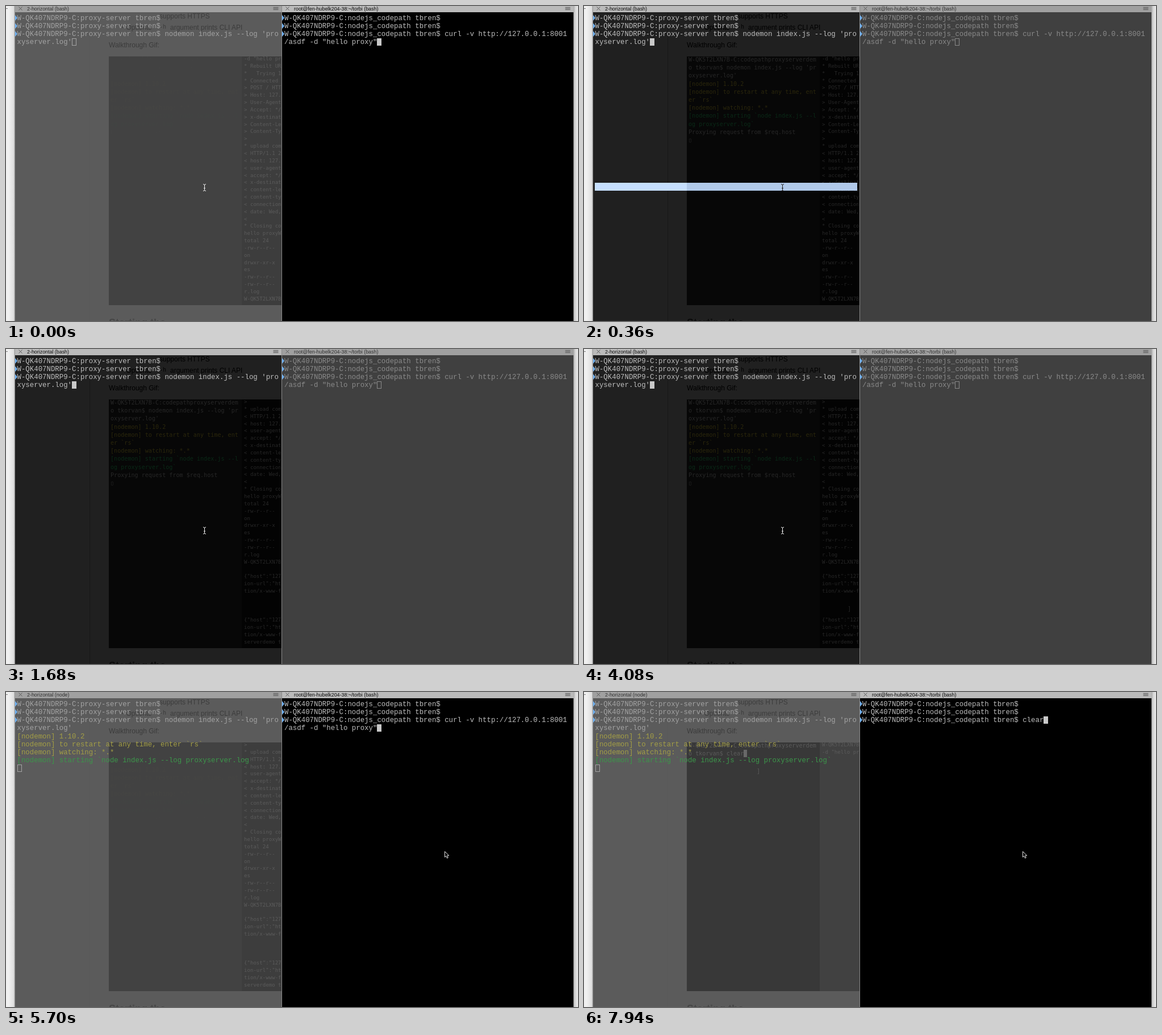
Recreate the animation shown at these times as an HTML page. Size 1007 by 556 pixels, loop 8 s.

```html
<!DOCTYPE html>
<html lang="en">
<head>
<meta charset="utf-8">
<style>
html, body { margin: 0; width: 100%; height: 100%; overflow: hidden; }
body { position: relative; background: #ececec; }
[hidden] { display: none !important; }
body div, body pre, body svg { position: absolute; margin: 0; white-space: pre; }
.edge { top: 0; bottom: 0; }

.pane {
  inset: 0; background: var(--bg); color: var(--fg);
  --bg: #404040; --fg: #8a8a8a; --bar: #a0a0a0; --name: #303030;
}
.pane.on { --bg: #000; --fg: #bebebe; --bar: #bababa; --name: #0a0a0a; }
#left {
  clip-path: inset(0 522px 0 16px);
  --bg: #5b5b5b; --fg: #a3a3a3; --page: #3c3c3c; --gif: #424242; --gif2: #3d3d3d;
  --faint: #5b5b5b; --rule: #595959; --yellow: #a39e46; --green: #3c964a;
}
#left.cleared { --gif: #383838; --gif2: #414141; }
#left.on {
  --bg: #202020; --fg: #bebebe; --page: #000; --gif: #070707; --gif2: #030303;
  --faint: #272727; --rule: #171717; --yellow: #b5b100; --green: #00a31c;
}
#right { clip-path: inset(0 8px 0 486px); }

.bar { left: 0; right: 0; top: 0; height: 11px; background: var(--bar); }
.name { top: 0; font: 8.9px/10px "Liberation Sans", Arial, sans-serif; color: var(--name); }
.icon { top: 0; width: 12px; height: 10px; stroke: #5c5c5c; fill: none; }

.term { top: 15px; font: 12.38px/14.15px "Liberation Mono", "Courier New", monospace; }
.mark { width: 4px; height: 10px; background: #6fb1f2; clip-path: polygon(0 0, 100% 50%, 0 100%); }
.caret {
  left: calc(var(--x) + var(--c) * 7.43px); top: calc(14.5px + var(--r) * 14.15px);
  width: 8px; height: 13.5px; box-sizing: border-box; border: 1px solid var(--fg);
}
.on .caret { background: #c9c9c9; border-color: #c9c9c9; }
.y { color: var(--yellow); }
.g { color: var(--green); }

.page { font: 12px/14px "Liberation Sans", Arial, sans-serif; color: var(--page); }
.gif { left: 181px; top: 89px; width: 304px; height: 439px; background: linear-gradient(90deg, var(--gif) 234px, var(--gif2) 0); }
.old { left: 184px; top: 88px; font: 10.1px/14.2px "DejaVu Sans Mono", monospace; color: var(--faint); }
.on .old .y { color: #2b270c; }
.on .old .g { color: #0a2917; }
.pane:not(.on) .ghost { opacity: .03; }
.side { left: 419px; top: 87px; font: 9.08px/12.85px "DejaVu Sans Mono", monospace; color: var(--faint); }
.block { display: inline-block; width: 6px; height: 13px; vertical-align: -3px; background: #686868; }
.sel { left: 19px; top: 311.5px; width: 462px; height: 14.5px; background: linear-gradient(90deg, #c6dfff 162px, #b0c9ea 0); }
.beam { left: 345px; top: 313px; width: 9px; height: 15px; fill: none; }
.arrow { width: 11px; height: 15px; }
</style>
</head>
<body>
<div class="edge" style="left:0;width:16px;background:linear-gradient(90deg,#f0f0f0 30%,#dedede 85%,#8c8c8c)"></div>
<div style="left:0;top:4px;width:3px;height:1px;background:#777"></div>
<div class="edge" style="right:0;width:8px;background:linear-gradient(90deg,#a9a9a9,#d6d6d6 40%,#e9e9e9)"></div>

<div class="pane" id="left" style="--x:19.5px">
  <div class="edge" style="left:147px;width:1px;background:var(--rule)"></div>
  <div class="page" style="left:270px;top:11px">supports HTTPS</div>
  <div class="page" style="left:204px;top:31px">• Optional</div>
  <div class="page" style="left:270px;top:31px;font:10px/14px 'Liberation Mono',monospace">-h</div>
  <div class="page" style="left:289px;top:31px">argument prints CLI API</div>
  <div class="page" style="left:181px;top:62px">Walkthrough Gif:</div>
  <div class="page" style="left:181px;top:549px;font-size:18px;line-height:20px;font-weight:bold;opacity:.7">Starting the</div>
  <div class="gif"></div>
  <pre class="old ghost" data-on="0-6650">W-QK5T2LXN7B-C:codepathproxyserverdem
o tkorvan$ nodemon index.js --log 'pr
oxyserver.log'
<span class="y">[nodemon] 1.10.2
[nodemon] to restart at any time, ent
er `rs`
[nodemon] watching: *.*</span>
<span class="g">[nodemon] starting `node index.js --l
og proxyserver.log`</span>
Proxying request from $req.host
▯</pre>
  <pre class="old" data-on="6650-8000">W-QK5T2LXN7B-C:codepathproxyserverdem
o tkorvan$ clear<i class="block"></i></pre>
  <pre class="side" id="side"></pre>
  <div class="old" style="left:464px;top:452px" data-on="4080-4220">]</div>
  <div class="old" style="left:454px;top:452px" data-on="4220-4370">]</div>
  <div class="old" style="left:304px;top:133px" data-on="6650-8000">]</div>

  <div class="bar"></div>
  <div class="name" style="left:37px">2-horizontal (<span data-on="0-4660">bash</span><span data-on="4660-8000">node</span>)</div>
  <div class="sel" data-on="150-1350"></div>
  <pre class="term" style="left:19.5px" id="shell"></pre>
  <pre class="term" style="left:19.5px;top:71.6px" data-on="4810-8000"><span class="y">[nodemon] 1.10.2
[nodemon] to restart at any time, enter `rs`
[nodemon] watching: *.*</span>
<span class="g">[nodemon] starting `node index.js --log proxyserver.log<span data-on="6650-8000">`</span></span></pre>
  <div class="caret" style="--c:13;--r:3" data-on="0-1350 1680-4370"></div>
  <div class="caret" style="--c:40;--r:2" data-on="1350-1680"></div>
  <div class="caret" style="--c:0;--r:4" data-on="4370-4810"></div>
  <div class="caret" style="--c:0;--r:8" data-on="4810-8000"></div>
</div>

<div class="pane" id="right" style="--x:490px">
  <div class="bar"></div>
  <div class="name" style="left:507px">root@fen-hubelk204-38:~/torbi (bash)</div>
  <pre class="term" style="left:490px" id="client"></pre>
  <div class="caret" style="--c:22;--r:3" data-on="0-7940"></div>
  <div class="caret" style="--c:43;--r:2" data-on="7940-8000"></div>
</div>
<div class="edge" style="left:485px;width:1px;background:#8a8a8a"></div>

<svg class="beam" data-on="0-5110" id="beam"><path d="M2 1.5Q4.5 1.5 4.5 3.5Q4.5 1.5 7 1.5M4.5 3V12M2 13.5Q4.5 13.5 4.5 11.5Q4.5 13.5 7 13.5M3 8.5H6"/></svg>
<svg class="arrow" id="arrow" data-on="5110-8000"><path d="M1.5 1.5V11.5L3.8 9.5L5.4 13.3L7.2 12.5L5.6 8.8H8.8Z" fill="#000" stroke="#e4e4e4"/></svg>

<script>
const LOOP = 8000;
const $ = id => document.getElementById(id);

// Window furniture shared by both panes
for (const [id, x, end] of [['left', 16, 469], ['right', 486, 983]]) {
  const icon = (left, d) =>
    `<svg class="icon" style="left:${left}px"><path d="${d}"/></svg>`;
  const marks = [0, 1, 2].map(r =>
    `<div class="mark" style="left:${x}px;top:${16 + r * 14.15}px"></div>`).join('');
  $(id).insertAdjacentHTML('beforeend',
    icon(x + 4, 'M2.5 1.5L8.5 7.5M8.5 1.5L2.5 7.5') +
    icon(end, 'M1.5 2.5H10.5M1.5 4.5H10.5M1.5 6.5H10.5') + marks);
}

const prompt = dir => `W-QK407NDRP9-C:${dir} tbren$`;
const lines = (dir, cmd) => [prompt(dir), prompt(dir), `${prompt(dir)} ${cmd}`].join('\n');

const log = `-d "hello pro
* Rebuilt UR
*   Trying 1
* Connected
> POST / HTT
> Host: 127.
> User-Agent
> Accept: */
> x-destinat
> Content-Le
> Content-Ty
>
* upload com
< HTTP/1.1 2
< host: 127.
< user-agent
< accept: */
< x-destinat
< content-le
< content-ty
< connection
< date: Wed,
<
* Closing co
hello proxyW
total 24
-rw-r--r--
on
drwxr-xr-x
es
-rw-r--r--
-rw-r--r--
r.log
W-QK5T2LXN7B`.split('\n');
const reply = ['{"host":"127', 'ion-url":"ht', 'tion/x-www-f'];
const scrolled = [...log.slice(11), '', ...reply, '', '', '', ...reply, 'serverdemo t'];
const cleared = ['W-QK5T2LXN7B', '-d "hello pr'];

const timed = [...document.querySelectorAll('[data-on]')].map(el => ({
  el, spans: el.dataset.on.split(' ').map(s => s.split('-').map(Number))
}));
const setText = (id, text) => { if ($(id).textContent !== text) $(id).textContent = text; };

function draw(now) {
  const t = now % LOOP;
  for (const { el, spans } of timed)
    el.toggleAttribute('hidden', !spans.some(([a, b]) => t >= a && t < b));

  const leftOn = t >= 360 && t < 5700;
  $('left').classList.toggle('on', leftOn);
  $('left').classList.toggle('cleared', t >= 6650);
  $('right').classList.toggle('on', !leftOn);

  setText('shell', lines('proxy-server', t >= 1350 && t < 1680
    ? 'clear' : "nodemon index.js --log 'pro\nxyserver.log'"));
  setText('client', lines('nodejs_codepath', t >= 7940
    ? 'clear' : 'curl -v http://127.0.0.1:8001\n/asdf -d "hello proxy"'));
  setText('side', (t < 810 ? log : t < 6650 ? scrolled : cleared).join('\n'));

  $('beam').style.stroke = t >= 150 && t < 1350 ? '#222' : '#eee';
  const [x, y] = t < 5260 ? [570, 255] : [t < 5400 ? 756 : 771, 280];
  $('arrow').style.left = x + 'px';
  $('arrow').style.top = y + 'px';
}

const start = performance.now();
function tick() {
  draw(performance.now() - start);
  requestAnimationFrame(tick);
}
tick();
</script>
</body>
</html>
```
